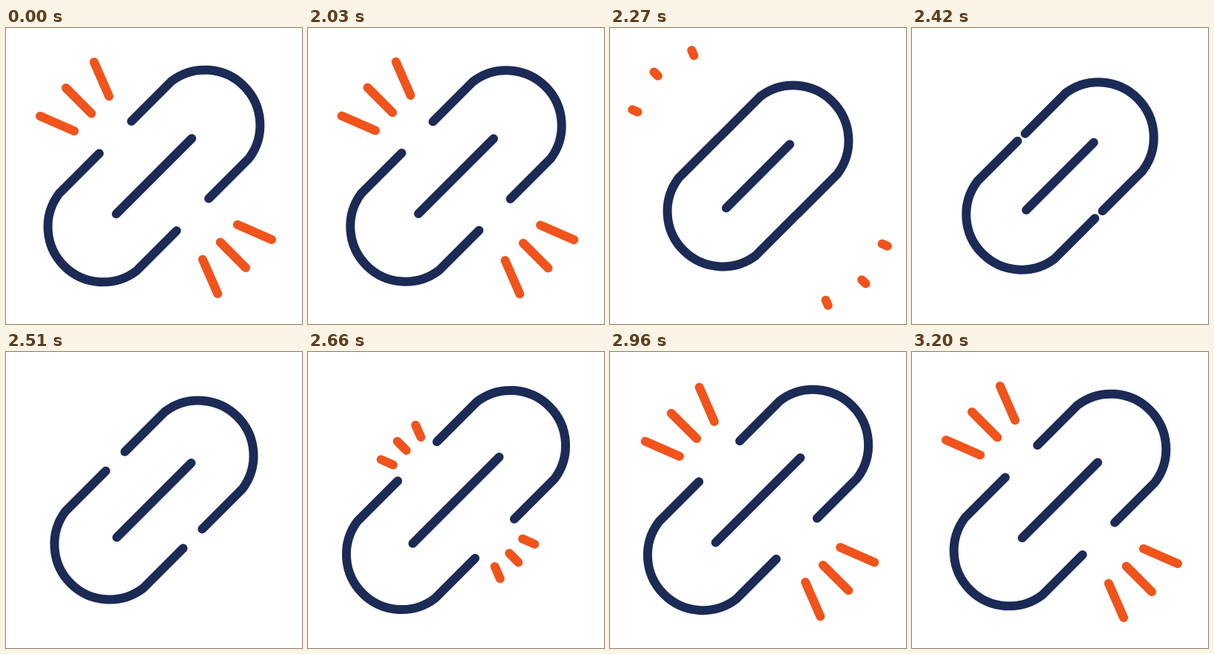
These frames come from a looping animation (400x400 px, 3.23 s). An HTML page:

```html
<!DOCTYPE html>
<html lang="en">
<head>
<meta charset="utf-8">
<title>Breaking link</title>
<style>
  html, body { margin: 0; height: 100%; overflow: hidden; background: #fff; }
  svg { display: block; width: 100vw; height: 100vh; fill: none; stroke-width: 12; stroke-linecap: round; stroke-linejoin: round; }
</style>
</head>
<body>
<svg viewBox="0 0 400 400">
  <defs>
    <path id="half" d="M169.5 126L223.75 71.75A74.6 74.6 0 0 1 328.25 176.25L274 230.5"/>
    <path id="rays"/>
  </defs>
  <g stroke="#1c2a56">
    <use id="upper" href="#half"/>
    <use id="lower" href="#half"/>
    <path id="bar"/>
  </g>
  <g stroke="#f1531c">
    <use href="#rays"/>
    <use href="#rays" transform="rotate(180 202.5 202.5)"/>
  </g>
</svg>
<script>
const LOOP = 3230, START = 2000, STEP = 30;
const el = id => document.getElementById(id);

// Each ray: resting ends, the point it shrinks into and the point it grows from.
const side = { outer: [46, 119], inner: [92.2, 139.2], exit: [27.2, 108.7], origin: [118, 150.3] };
const middle = { outer: [81, 81], inner: [115.4, 115.4], exit: [55.4, 55.4], origin: [133, 133] };
const swapped = Object.fromEntries(Object.entries(side).map(([k, [x, y]]) => [k, [y, x]]));
const rays = [side, middle, swapped];

const mix = (a, b, p) => a + (b - a) * p;
const mixPoint = (a, b, p) => a.map((v, i) => mix(v, b[i], p));

function ease(step, from, to) {
  const p = Math.min(1, Math.max(0, (step - from) / (to - from)));
  return p * p * (3 - 2 * p);
}

// Eased value through [step, value] keys.
function track(step, keys) {
  let value = keys[0][1];
  for (let i = 1; i < keys.length; i++) {
    const [from] = keys[i - 1], [to, target] = keys[i];
    value = mix(value, target, ease(step, from, to));
  }
  return value;
}

function rayPath(ray, step) {
  let ends;
  if (step < 12) {
    const p = ease(step, 0, 12);
    ends = [mixPoint(ray.outer, ray.exit, p), mixPoint(ray.inner, ray.exit, p)];
  } else if (step > 18) {
    const p = ease(step, 18, 28), drift = 8.6 * (1 - ease(step, 12, 40));
    ends = [ray.outer, ray.inner].map(end => mixPoint(ray.origin, end, p).map(v => v + drift));
  } else return "";
  return `M${ends[0]}L${ends[1]}`;
}

function draw(now) {
  const step = Math.max(0, Math.floor((now % LOOP - START) / STEP));
  const shift = track(step, [[0, 0], [10, -21.5], [26, 9.6], [40, 0]]);
  const reach = track(step, [[0, 51], [10, 42.7], [26, 61.3], [40, 51]]);

  el("upper").setAttribute("transform", `translate(${shift} ${-shift})`);
  el("lower").setAttribute("transform", `rotate(180 200 200) translate(${shift} ${-shift})`);
  el("bar").setAttribute("d", `M${200 - reach} ${200.3 + reach}L${200 + reach} ${200.3 - reach}`);
  el("rays").setAttribute("d", rays.map(ray => rayPath(ray, step)).join(""));
}

const begin = performance.now();
function frame() {
  draw(performance.now() - begin);
  requestAnimationFrame(frame);
}
frame();
</script>
</body>
</html>
```
